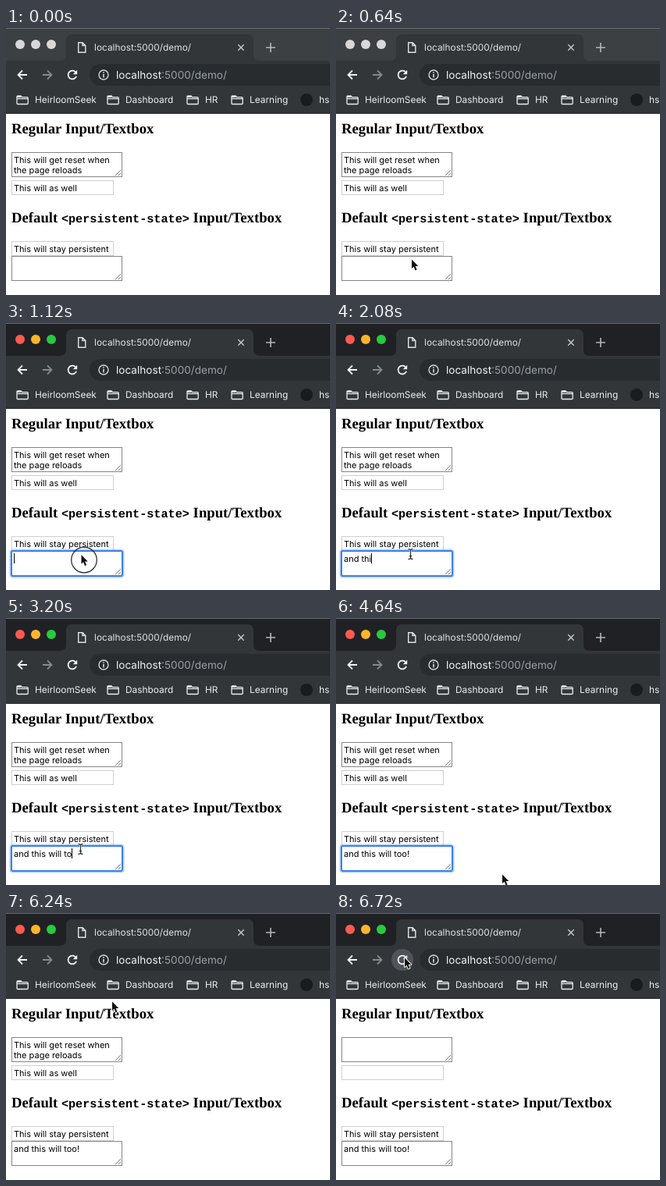
An HTML page with a canvas that plays this animation: 415 px wide and 342 px high, repeating every 8000 ms.

```html
<!DOCTYPE html>
<html lang="en">
<head>
<meta charset="utf-8">
<title>Form state demo</title>
<style>
html, body { margin: 0; width: 100%; height: 100%; overflow: hidden; background: #fff; }
canvas { display: block; }
</style>
</head>
<body>
<canvas id="stage" width="415" height="342"></canvas>
<script>
const ctx = document.getElementById('stage').getContext('2d');
ctx.textRendering = 'geometricPrecision';
const LOOP = 8000, STEP = 160;
const ACTIVATE = 960, BEAM = 1280, LEAVE = 4320, BLUR = 5440, HOVER = 6560, RELOAD = 6720;
const SANS = 'Inter, "Liberation Sans", sans-serif';
const SERIF = 'bold 18.72px "Liberation Serif", serif';
const MONO = 'bold 15.2px "Liberation Mono", monospace';
const FIELD = '11px ' + SANS;
const LABEL = '11.9px ' + SANS;
const MESSAGE = 'and this will too!';

// time, characters typed
const typing = [[1600, 1], [1760, 3], [1920, 5], [2080, 7], [2240, 9], [2400, 10], [2560, 12],
  [2880, 13], [3040, 15], [3200, 16], [3520, 17], [3840, 18]];

// time, x, y of the pointer
const pointerPath = [[160, 150, 335], [640, 96, 295], [960, 95, 295], [1280, 96, 296],
  [4160, 96, 296], [4320, 78, 300], [4480, 140, 322], [4640, 212, 327], [4800, 208, 285],
  [4960, 196, 225], [5120, 188, 183], [5280, 184, 196], [5760, 184, 196], [5920, 183, 189],
  [6080, 165, 155], [6240, 135, 112], [6400, 105, 75], [6560, 88, 58], [6720, 87, 56]];

function rect(x, y, w, h, color) {
  ctx.fillStyle = color;
  ctx.fillRect(x, y, w, h);
}

function text(str, x, y, font, color) {
  ctx.font = font;
  ctx.fillStyle = color;
  ctx.fillText(str, x, y);
  return x + ctx.measureText(str).width;
}

function disc(x, y, r, color) {
  ctx.fillStyle = color;
  ctx.beginPath();
  ctx.arc(x, y, r, 0, Math.PI * 2);
  ctx.fill();
}

function ring(x, y, r, color, width) {
  ctx.strokeStyle = color;
  ctx.lineWidth = width;
  ctx.beginPath();
  ctx.arc(x, y, r, 0, Math.PI * 2);
  ctx.stroke();
}

function roundBox(x, y, w, h, r, color, width) {
  ctx.strokeStyle = color;
  ctx.lineWidth = width;
  ctx.beginPath();
  ctx.roundRect(x, y, w, h, r);
  ctx.stroke();
}

function outline(path, x, y, color, width) {
  ctx.save();
  ctx.translate(x, y);
  ctx.strokeStyle = color;
  ctx.lineWidth = width;
  ctx.stroke(new Path2D(path));
  ctx.restore();
}

function pointerAt(t) {
  const next = pointerPath.findIndex(key => key[0] >= t);
  if (next < 0) return pointerPath[pointerPath.length - 1].slice(1);
  const b = pointerPath[next], a = pointerPath[Math.max(0, next - 1)];
  const k = b === a ? 0 : (t - a[0]) / (b[0] - a[0]);
  return [a[1] + (b[1] - a[1]) * k, a[2] + (b[2] - a[2]) * k];
}

function drawTabStrip(active) {
  rect(0, 0, 415, 42, active ? '#202124' : '#3c4043');
  rect(0, 0, 415, 1, '#6a6b6d');
  const lights = active ? ['#ff5a50', '#fdb62c', '#28ca40'] : ['#d8d8d8', '#d8d8d8', '#d8d8d8'];
  lights.forEach((color, i) => disc(18 + 20 * i, 21, 6, color));
  ctx.fillStyle = '#323639';
  ctx.fill(new Path2D('M69 42Q77 42 77 34V16Q77 8 85 8H309Q317 8 317 16V34Q317 42 325 42Z'));
  outline('M.7.7H6L9.8 4.5V13.3H.7ZM6 .7V4.5H9.8', 92, 18, '#dfe1e5', 1.4);
  text('localhost:5000/demo/', 113, 29, LABEL, '#dfe1e5');
  outline('M-3.7-3.7L3.7 3.7M3.7-3.7L-3.7 3.7', 301, 25, '#c6c9cd', 1.4);
  outline('M-6 0H6M0-6V6', 339, 25, '#b4b7bb', 1.6);
}

function drawFolder(x) {
  outline('M1 2Q1 .8 2.2 .8H6L7.6 2.6H14Q15.2 2.6 15.2 3.8V10.4Q15.2 11.5 14 11.5H2.2Q1 11.5 1 10.4Z',
    x, 86, '#eceef0', 1.3);
  rect(x + 1, 87, 5.5, 2, '#eceef0');
  rect(x + 1, 90, 14, 1.2, '#eceef0');
}

function drawToolbar(hover) {
  rect(0, 42, 415, 67, '#323639');
  rect(0, 109, 415, 1, '#28292c');
  if (hover) disc(85, 60, 14, '#505357');
  outline('M6 0H-5M0-5.5L-5.5 0L0 5.5', 21, 60, '#f1f3f4', 1.8);
  outline('M-6 0H5M0-5.5L5.5 0L0 5.5', 53, 60, '#85888c', 1.8);

  ctx.strokeStyle = '#f1f3f4';
  ctx.lineWidth = 1.8;
  ctx.beginPath();
  ctx.arc(85, 60, 5.4, 0.35, Math.PI * 1.76);
  ctx.stroke();
  ctx.fillStyle = '#f1f3f4';
  ctx.fill(new Path2D('M91.2 53.8V59.2H85.8Z'));

  ctx.fillStyle = '#282c2f';
  ctx.beginPath();
  ctx.roundRect(107, 46, 330, 28, 14);
  ctx.fill();
  ring(125, 60, 6, '#d5d7da', 1.4);
  rect(124.2, 59, 1.6, 4.5, '#d5d7da');
  rect(124.2, 56.3, 1.6, 1.6, '#d5d7da');
  const address = '13.6px ' + SANS;
  const end = text('localhost', 141, 65, address, '#f1f3f4');
  text(':5000/demo/', end, 65, address, '#9aa0a6');

  const bookmarks = [[13, 'HeirloomSeek'], [129, 'Dashboard'], [231, 'HR'], [288, 'Learning']];
  bookmarks.forEach(([x, name]) => {
    drawFolder(x);
    text(name, x + 24, 96, LABEL, '#eceef0');
  });
  disc(385, 92, 8, '#191c1f');
  text('hs-', 401, 96, LABEL, '#eceef0');
}

function drawInput(y, value) {
  rect(7, y, 131, 19, '#fff');
  ctx.strokeStyle = '#cfcfcf';
  ctx.lineWidth = 1;
  ctx.strokeRect(7.5, y + 0.5, 130, 18);
  text(value, 10, y + 14, FIELD, '#000');
}

function drawTextarea(y, lines, focused) {
  rect(7, y, 142, 32, '#fff');
  ctx.strokeStyle = '#858585';
  ctx.lineWidth = 1;
  ctx.strokeRect(7.5, y + 0.5, 141, 31);
  lines.forEach((str, i) => text(str, 10, y + 14 + 13 * i, FIELD, '#000'));
  outline('M140 30L147 23M144 30L147 27', 0, y, '#777', 1);
  if (!focused) return;
  roundBox(5.7, y - 1.3, 144.6, 34.6, 3, 'rgba(80,145,240,.4)', 2.6);
  roundBox(7, y, 142, 32, 2, '#3b80e8', 2);
}

function drawPage(t) {
  rect(0, 110, 415, 232, '#fff');
  text('Regular Input/Textbox', 7, 135, SERIF, '#000');
  let x = text('Default ', 7, 249, SERIF, '#000');
  x = text('<persistent-state>', x, 249, MONO, '#000');
  text(' Input/Textbox', x, 249, SERIF, '#000');

  const cleared = t >= RELOAD;
  drawTextarea(159, cleared ? [] : ['This will get reset when', 'the page reloads'], false);
  drawInput(195, cleared ? '' : 'This will as well');
  drawInput(273, 'This will stay persistent');

  const count = typing.reduce((n, [time, chars]) => t >= time ? chars : n, 0);
  const typed = MESSAGE.slice(0, count);
  drawTextarea(292, [typed], t >= ACTIVATE && t < BLUR);
  if (t >= ACTIVATE && t < LEAVE) {
    ctx.font = FIELD;
    rect(Math.round(10 + ctx.measureText(typed).width), 295, 1, 13, '#000');
  }
}

function drawPointer(t) {
  if (t < STEP) return;
  const [x, y] = pointerAt(t);
  if (t >= ACTIVATE && t < BEAM) ring(x + 4.5, y + 8, 16.3, '#222', 1.2);
  if (t >= BEAM && t <= LEAVE) {
    const beam = 'M-3-6.5Q0-6.5 0-4.5Q0-6.5 3-6.5M0-5V5M-3 6.5Q0 6.5 0 4.5Q0 6.5 3 6.5M-1.5 2.5H1.5';
    outline(beam, x - 0.5, y, '#fff', 2.4);
    outline(beam, x - 0.5, y, '#333', 1.3);
    return;
  }
  const arrow = new Path2D('M1 1.4V13L3.6 10.7L5.6 15.4L7.6 14.6L5.6 9.9H9.3Z');
  ctx.save();
  ctx.translate(x, y);
  ctx.lineJoin = 'round';
  ctx.strokeStyle = '#fff';
  ctx.lineWidth = 1.8;
  ctx.stroke(arrow);
  ctx.fillStyle = '#111';
  ctx.fill(arrow);
  ctx.restore();
}

function render(now) {
  const t = Math.floor((now % LOOP) / STEP) * STEP;
  drawTabStrip(t >= ACTIVATE);
  drawToolbar(t >= HOVER);
  drawPage(t);
  drawPointer(t);
}

const start = performance.now();
function tick() {
  render(performance.now() - start);
  requestAnimationFrame(tick);
}
tick();
</script>
</body>
</html>
```
